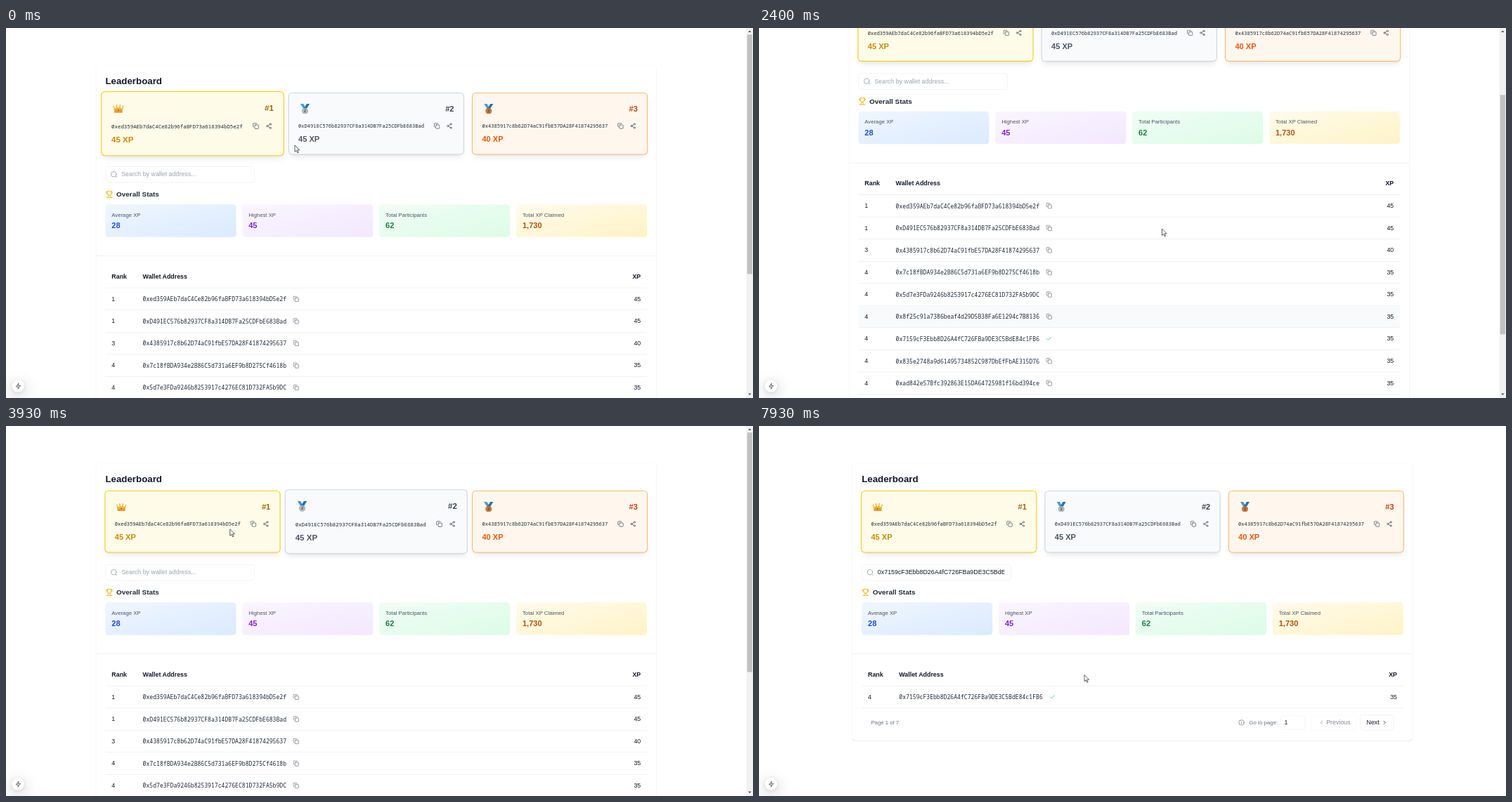
Recreate the animation shown at these times as an HTML page. Size 1063 by 527 pixels, loop 8000 ms.

```html
<!DOCTYPE html>
<html lang="en">
<head>
<meta charset="utf-8">
<title>Leaderboard</title>
<style>
html, body { margin: 0; width: 100%; height: 100%; overflow: hidden; background: #fff; }
#stage { position: absolute; width: 1920px; height: 952px; overflow: hidden; transform-origin: 0 0;
  font: 16px "Liberation Sans", Arial, sans-serif; color: #111827; }
#stage div, #stage p, #stage svg { position: absolute; box-sizing: border-box; margin: 0; }
p { line-height: 0; white-space: nowrap; }
.mono { font-family: "Noto Sans Mono", monospace; font-size: 14.66px; color: #1f2937; }
.small { font-size: 14px; }
.bold { font-weight: bold; }
.big { font-weight: bold; font-size: 20px; }
#page { left: 0; top: 0; width: 1440px; }
#panel { top: 96px; width: 1440px; border-radius: 8px;
  box-shadow: 0 1px 3px rgba(0,0,0,.1), 0 1px 2px -1px rgba(0,0,0,.1); }
.card { top: 168px; width: 448px; height: 156px; border-radius: 8px; }
.stat { top: 454px; width: 336px; height: 84px; border-radius: 8px; }
.line { height: 1px; background: #e2e5e9; }
.row { left: 24px; width: 1392px; height: 57px; border-bottom: 1px solid #e2e5e9; }
.box { border: 1px solid #e5e7eb; border-radius: 6px; }
#search { left: 24px; top: 356px; width: 384px; height: 42px; border-radius: 8px; }
#search.focus { border-color: #3b82f6; box-shadow: 0 0 0 2px #3b82f6; }
#field { left: 65px; top: 357px; width: 326px; height: 40px; overflow: hidden; }
#caret { top: 11px; width: 1.5px; height: 18px; background: #000; }
#foot { left: 0; width: 1440px; height: 1px; }
#bar { left: 1903px; top: 0; width: 17px; height: 952px; background: #f1f1f1; }
#thumb { left: 2px; width: 13px; height: 616px; background: #c1c1c1; }
#bolt { left: 15px; top: 905px; width: 32px; height: 32px; border-radius: 50%; background: #fff;
  box-shadow: 0 11px 40px rgba(0,0,0,.25), 0 2px 10px rgba(0,0,0,.12); }
#cursor { overflow: visible; }
</style>
</head>
<body>
<div id="stage"></div>
<script>
const SCALE = 1063 / 1920, LOOP = 8000, FRAME = 1000 / 15;
const WALLETS = [
  "0xed359AEb7daC4Ce82b96faBFD73a618394bD5e2f", "0xD491EC576b82937CF8a314DB7Fa25CDFbE683Bad",
  "0x4385917c8b62D74aC91fbE57DA28F41874295637", "0x7c18fBDA934e2B86C5d731a6EF9b8D275Cf4618b",
  "0x5d7e3FDa9246b8253917c4276EC81D732FA5b9DC", "0x8f25c91a7386beaf4d29D5B38Fa6E1294c7B8136",
  "0x7159cF3Ebb8D26A4fC726FBa9DE3C5BdE84c1FB6", "0x835e2748a9d61495734852C987DbEfFbAE315D76",
  "0xad842e57Bfc392863E15DA64725981f16bd394ce", "0x984f2715c37485e926d164b3aeF528cb7348Dae9"];
const RANKS = [1, 1, 3], POINTS = [45, 45, 40];
const COPIED = 6, ROW_TOP = 669, ROW_HEIGHT = 57;

// Event times in ms
const FOCUS = 4600, PASTE = 4930, BLUR = 5900;
const COPY_TIMES = [[1600, 3600], [7460, 9500]];
const CARD_HOVERS = [
  [[-500, -50], [3060, 3264], [3925, 4400]],
  [[5, 530], [3272, 3447], [3686, 3875]],
  [[3455, 3678]]];
const SCROLL = [[333, 0], [400, 130], [467, 380], [533, 466], [2267, 466], [2333, 390], [2400, 239.5],
  [2467, 175], [2667, 70], [2733, 25], [2800, 0]];
const PATH = [[0, 411, 167], [200, 499.5, 163], [735, 499.5, 163], [1333, 413, 316, "hand"], [1620, 413, 316],
  [2000, 573.5, 286], [2800, 573.5, 286], [3130, 290, 150], [3200, 300, 150], [3530, 770, 150],
  [3600, 770, 150], [3930, 319, 147], [4200, 300, 150], [4540, 300, 207, "text"], [4930, 300, 209],
  [5330, 393.5, 245.5], [5800, 398, 290], [6560, 369, 386, "text"], [6600, 367, 386, "text"],
  [6730, 304, 386, "text"], [6870, 304, 386, "text"], [7270, 400, 386], [7330, 417, 385, "hand"],
  [7470, 417, 385], [7670, 481, 343], [7800, 481, 343], [7930, 463, 354.5]];

const GLYPHS = {
  copy: '<rect x="8" y="8" width="14" height="14" rx="2"/><path d="M4 16a2 2 0 0 1-2-2V4a2 2 0 0 1 2-2h10a2 2 0 0 1 2 2"/>',
  check: '<path d="M20 6L9 17l-5-5"/>',
  share: '<circle cx="18" cy="5" r="3"/><circle cx="6" cy="12" r="3"/><circle cx="18" cy="19" r="3"/><path d="M8.6 13.5l6.8 4M15.4 6.5l-6.8 4"/>',
  search: '<circle cx="11" cy="11" r="8"/><path d="M21 21l-4.3-4.3"/>',
  info: '<circle cx="12" cy="12" r="10"/><path d="M12 16v-4M12 8v.1"/>',
  left: '<path d="M15 18l-6-6 6-6"/>',
  right: '<path d="M9 18l6-6-6-6"/>',
  bolt: '<path d="M13 2L4 14h8l-1 8 9-12h-8z"/>',
  trophy: '<path d="M6 9H4.5a2.5 2.5 0 0 1 0-5H6M18 9h1.5a2.5 2.5 0 0 0 0-5H18M4 22h16M10 14.7V17c0 .6-.5 1-1 1.2C7.8 18.8 7 20.2 7 22M14 14.7V17c0 .6.5 1 1 1.2 1.2.6 2 2 2 3.8M18 2H6v7a6 6 0 0 0 12 0z"/>'
};
const CURSORS = {
  arrow: '<path d="M0 0V17L4 13.2 6.8 19.5 9.4 18.4 6.7 12.2H12Z" fill="#fff" stroke="#222" stroke-width="1.3"/>',
  text: '<path d="M-3-9H3M0-9V9M-3 9H3" fill="none" stroke="#222" stroke-width="1.5"/>',
  hand: '<path d="M-2 1Q0-2 2 1V8L9 10Q11 11 10 15L8 21H-1L-6 13Q-6 10-2 13Z" fill="#fff" stroke="#222" stroke-width="1.3"/>'
};

const text = (x, y, content, cls = "", css = "") =>
  `<p class="${cls}" style="left:${x}px;top:${y}px;${css}">${content}</p>`;
const textRight = (right, y, content, cls = "", css = "") =>
  `<p class="${cls}" style="right:${right}px;top:${y}px;${css}">${content}</p>`;
const art = (x, y, size, body, attrs = "") =>
  `<svg viewBox="0 0 24 24" width="${size}" height="${size}" style="left:${x - size / 2}px;top:${y - size / 2}px" ${attrs}>${body}</svg>`;
const icon = (x, y, size, name, color, cls = "") => art(x, y, size, GLYPHS[name],
  `class="${cls}" fill="none" stroke="${color}" stroke-width="2" stroke-linecap="round" stroke-linejoin="round"`);

const crown = art(40.5, 41, 26, `<path d="M1 7l5 5 2-7 4 6 4-6 2 7 5-5-2 14H3z" fill="#fbb62b"/>
  <path d="M3 18h18v3H3z" fill="#e8912d"/><g fill="#f9a825"><circle cx="1.5" cy="7" r="1.5"/><circle cx="8" cy="4.5" r="1.5"/>
  <circle cx="16" cy="4.5" r="1.5"/><circle cx="22.5" cy="7" r="1.5"/></g>
  <circle cx="12" cy="15.5" r="2" fill="#d9485f"/><circle cx="6.5" cy="16" r="1.3" fill="#4a90d9"/><circle cx="17.5" cy="16" r="1.3" fill="#4a90d9"/>`);
const medal = (place, disc, rim) => art(40.5, 40, 26, `<path d="M1 0h7l6 10-5 3z" fill="#3f9be0"/>
  <path d="M23 0h-7l-6 10 5 3z" fill="#2470b8"/><circle cx="12" cy="17" r="6.7" fill="${disc}" stroke="${rim}"/>
  <text x="12" y="20.2" font-size="9" font-weight="bold" text-anchor="middle" fill="#4b4038">${place}</text>`);

const CARDS = [
  { badge: crown, fill: "#fefce8", ring: "#facc15", place: "#a16207", xp: "#ca8a04" },
  { badge: medal(2, "#b4bec6", "#8d99a3"), fill: "#f9fafb", ring: "#d1d5db", place: "#374151", xp: "#4b5563" },
  { badge: medal(3, "#cf7a35", "#a3571f"), fill: "#fff7ed", ring: "#fdba74", place: "#c2410c", xp: "#ea580c" }];
const STATS = [
  ["Average XP", "28", "#eff6ff", "#dbeafe", "#1d4ed8"],
  ["Highest XP", "45", "#faf5ff", "#f3e8ff", "#7e22ce"],
  ["Total Participants", "62", "#f0fdf4", "#dcfce7", "#15803d"],
  ["Total XP Claimed", "1,730", "#fffbeb", "#fef3c7", "#b45309"]];

const cardHtml = (c, i) => `<div class="card" style="left:${24 + 472 * i}px;background:${c.fill};
  box-shadow:0 0 0 2px ${c.ring},0 10px 15px -3px rgba(0,0,0,.1),0 4px 6px -4px rgba(0,0,0,.1)">
  ${c.badge}${textRight(24, 40, "#" + (i + 1), "big", `color:${c.place}`)}
  ${text(24, 84, WALLETS[i], "mono", "font-size:12.83px")}
  ${icon(380, 84, 16, "copy", "#4b5563")}${icon(412, 84, 16, "share", "#4b5563")}
  ${text(24, 118, POINTS[i] + " XP", "big", `color:${c.xp}`)}</div>`;
const statHtml = ([label, value, from, to, color], i) => `<div class="stat"
  style="left:${24 + 352 * i}px;background:linear-gradient(to bottom right,${from},${to})">
  ${text(16, 26, label, "small", "color:#4b5563")}${text(16, 54, value, "big", `color:${color}`)}</div>`;
const rowHtml = (wallet, i) => `<div class="row">${text(16, 28, RANKS[i] || 4)}${text(96, 28, wallet, "mono")}
  ${icon(489.5, 28, 16, "copy", "#6b7280", "copy")}${icon(489.5, 28, 16, "check", "#22c55e", "check")}
  ${textRight(16, 28, POINTS[i] || 35)}</div>`;

const $ = id => document.getElementById(id);
const stage = $("stage");
stage.style.transform = `scale(${SCALE})`;
stage.innerHTML = `<div id="page"><div id="panel"></div>
  ${text(24, 136, "Leaderboard", "bold", "font-size:24px")}
  ${CARDS.map(cardHtml).join("")}
  <div id="search" class="box"></div>${icon(46, 377, 20, "search", "#9ca3af")}
  <div id="field">${text(0, 20, "", "", "").replace("<p", '<p id="query"')}<div id="caret"></div></div>
  ${icon(34, 428, 20, "trophy", "#eab308")}${text(52, 428, "Overall Stats", "bold", "font-size:18px;color:#1f2937")}
  ${STATS.map(statHtml).join("")}
  <div class="line" style="top:586px;width:1440px"></div>
  ${text(40, 639, "Rank", "bold")}${text(120, 639, "Wallet Address", "bold")}${textRight(40, 639, "XP", "bold")}
  <div class="line" style="left:24px;top:668px;width:1392px"></div>
  ${WALLETS.map(rowHtml).join("")}
  <div id="foot">${text(48, 37, "Page 1 of 7", "small", "color:#6b7280")}
    ${icon(1000, 37, 16, "info", "#6b7280")}${text(1020, 37, "Go to page:", "small", "color:#6b7280")}
    <div class="box" style="left:1100px;top:19px;width:64px;height:36px"></div>${text(1110, 37, "1")}
    <div style="opacity:.5"><div class="box" style="left:1180px;top:17px;width:117px;height:40px"></div>
      ${icon(1206, 37, 16, "left", "#111827")}${text(1218, 37, "Previous")}</div>
    <div class="box" style="left:1305px;top:17px;width:87px;height:40px"></div>
    ${text(1321.5, 37, "Next")}${icon(1367.5, 37, 16, "right", "#111827")}</div></div>
  <div id="bar"><div id="thumb"></div><svg width="17" height="952" fill="#505050">
    <path d="M4.5 11h8L8.5 6.5zM4.5 940h8l-4 4.5z"/></svg></div>
  <div id="bolt">${icon(16, 16, 17, "bolt", "#444")}</div>
  <svg id="cursor" width="1" height="1" style="left:0;top:0"></svg>`;

const cards = [...document.querySelectorAll(".card")], rows = [...document.querySelectorAll(".row")];
const ease = u => { u = Math.min(1, Math.max(0, u)); return u * u * (3 - 2 * u); };
const within = (t, spans) => spans.some(([a, b]) => t >= a && t < b);
const hoverAmount = (t, spans) => Math.max(...spans.map(([a, b]) => ease((Math.min(t, b) - a) / 200) * (1 - ease((t - b) / 200))));

function sample(keys, t) {
  const next = keys.findIndex(k => k[0] > t);
  if (next === 0) return keys[0].slice(1);
  if (next < 0) return keys[keys.length - 1].slice(1);
  const a = keys[next - 1], b = keys[next], u = (t - a[0]) / (b[0] - a[0]);
  return a.slice(1).map((v, i) => typeof v === "number" ? v + (b[i + 1] - v) * u : v);
}

function draw(t) {
  const filtered = t >= PASTE, focused = t >= FOCUS && t < BLUR;
  const [scroll] = sample(SCROLL, t), [x, y, kind = "arrow"] = sample(PATH, t);

  $("page").style.transform = `translate(${filtered ? 240 : 231.5}px,${-scroll}px)`;
  $("bar").style.display = filtered ? "none" : "";
  $("thumb").style.top = 17 + scroll / 466 * 302 + "px";
  cards.forEach((card, i) => {
    const amount = hoverAmount(t, CARD_HOVERS[i]);
    card.style.transform = amount ? `scale(${1 + 0.05 * amount})` : "";
  });

  // Row hover follows the scroll position only once scrolling has settled.
  const settled = t > 460 && t < 2800 ? 466 : 0;
  const hovered = Math.floor((y / SCALE + settled - ROW_TOP) / ROW_HEIGHT);
  rows.forEach((row, i) => {
    const slot = filtered ? 0 : i, copied = i === COPIED && within(t, COPY_TIMES);
    row.style.display = filtered && i !== COPIED ? "none" : "";
    row.style.top = ROW_TOP + slot * ROW_HEIGHT + "px";
    row.style.background = slot === hovered ? "#f9fafb" : "";
    row.querySelector(".copy").style.display = copied ? "none" : "";
    row.querySelector(".check").style.display = copied ? "" : "none";
  });
  const tableEnd = ROW_TOP + ROW_HEIGHT * (filtered ? 1 : rows.length);
  $("foot").style.top = tableEnd + "px";
  $("panel").style.height = tableEnd + 83 - 96 + "px";

  const query = $("query"), caret = $("caret"), atEnd = focused && filtered;
  $("search").classList.toggle("focus", focused);
  query.textContent = filtered ? WALLETS[COPIED] : "Search by wallet address...";
  query.style.color = filtered ? "#111827" : "#9ca3af";
  query.style.left = atEnd ? "auto" : "0";
  query.style.right = atEnd ? "1px" : "auto";
  caret.style.left = atEnd ? "324.5px" : "0";
  const blink = (t - (filtered ? PASTE : FOCUS)) % 1000 < 500;
  caret.style.display = focused && blink ? "" : "none";

  const cursor = $("cursor");
  if (cursor.dataset.kind !== kind) {
    cursor.innerHTML = CURSORS[kind];
    cursor.dataset.kind = kind;
  }
  cursor.style.transform = `translate(${x / SCALE}px,${y / SCALE}px)`;
}

const start = performance.now();
function tick() {
  const t = (performance.now() - start) % LOOP;
  draw(Math.floor((t + 5) / FRAME) * FRAME);
  requestAnimationFrame(tick);
}
tick();
</script>
</body>
</html>
```
